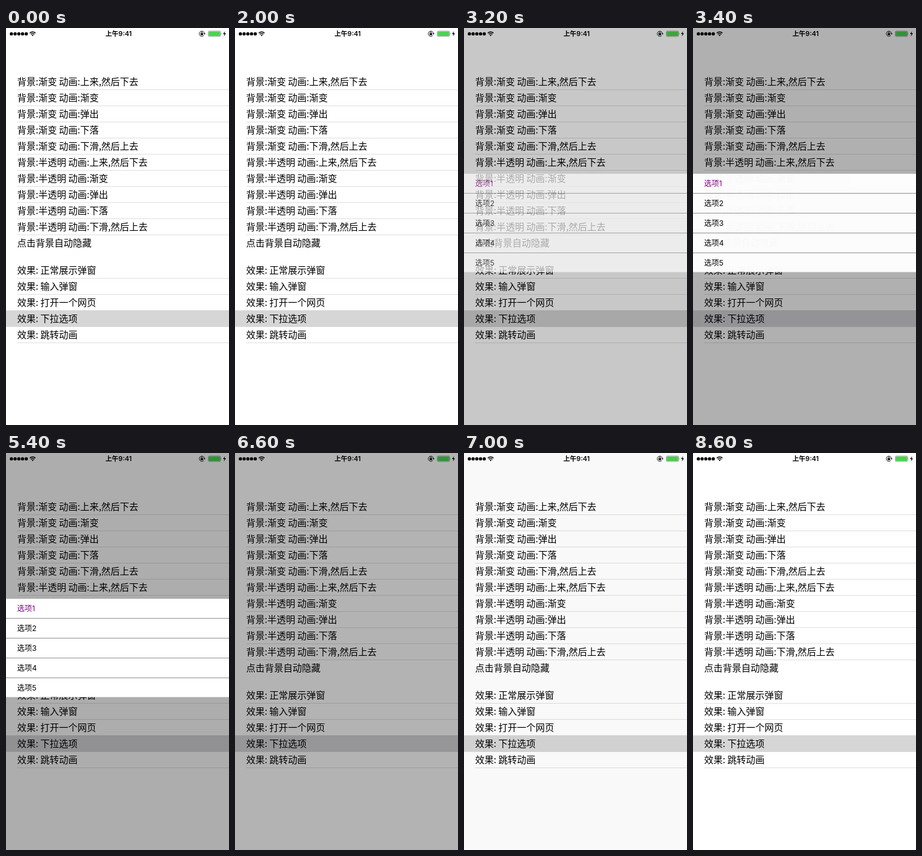
Animation of 360x640 px, one loop 8.8 s. Source, as an HTML page:

```html
<!DOCTYPE html>
<html lang="zh-CN">
<head>
<meta charset="utf-8">
<style>
html, body { margin: 0; width: 100%; height: 100%; overflow: hidden; background: #fff; }
svg { display: block; width: 360px; height: 640px; }
#list { font: 15px "Noto Sans CJK SC", "Noto Sans CJK", sans-serif; }
#panel { font: 12px Inter, "Noto Sans CJK SC", "Noto Sans CJK", sans-serif; }
#clock { font: 600 10.6px Inter, "Noto Sans CJK SC", "Noto Sans CJK", sans-serif; }
text { white-space: pre; }
</style>
</head>
<body>
<svg viewBox="0 0 360 640">
  <rect width="360" height="640" fill="#fff"/>
  <g id="list"></g>
  <g id="dots"></g>
  <g fill="none" stroke="#000" stroke-width="1.5">
    <path d="M38.4 8.2a6.6 6.6 0 0 1 9.2 0M40.2 10.2a4 4 0 0 1 5.6 0"/>
    <path d="M43 13.2l-1.6-1.7a2.3 2.3 0 0 1 3.2 0z" fill="#000" stroke="none"/>
  </g>
  <text id="clock" x="181.7" y="13" text-anchor="middle">上午9:41</text>
  <g fill="none" stroke="#000" stroke-width=".9">
    <path d="M319.2 12.2a4.2 4.2 0 1 1 1.2-3.2"/>
    <path d="M315 8.8v-1a1.2 1.2 0 0 1 2.4 0v1"/>
    <path d="M319 8.8h3l-1.5 2zM314.2 8.5h4v3h-4z" fill="#000" stroke="none"/>
  </g>
  <rect x="326.5" y="4.8" width="20" height="9" rx="1.8" fill="#fff" stroke="#777" stroke-width=".6"/>
  <rect x="327.2" y="5.5" width="18.6" height="7.6" rx="1" fill="#4cd250"/>
  <path d="M347.3 7.8q1.4 1.5 0 3z" fill="#777"/>
  <path d="M353.6 5l-3.2 4.8h2.3l-1.2 4 3.7-5.2h-2.4z"/>
  <rect id="dim" width="360" height="640" fill="#030004"/>
  <g id="panel"><rect y="235" width="360" height="158.5" fill="#fff"/></g>
</svg>
<script>
const LOOP = 8800, STEP = 200, MAX_DIM = 0.32;
const $ = id => document.getElementById(id);

function add(parent, tag, attrs, label = "") {
  const el = document.createElementNS("http://www.w3.org/2000/svg", tag);
  for (const key in attrs) el.setAttribute(key, attrs[key]);
  el.textContent = label;
  $(parent).append(el);
}

function rule(parent, x, y, fill) {
  add(parent, "rect", { x, y, width: 360 - x, height: 1, fill });
}

const moves = ["上来,然后下去", "渐变", "弹出", "下落", "下滑,然后上去"];
const rows = ["渐变", "半透明"].flatMap(bg => moves.map(m => `背景:${bg} 动画:${m}`));
rows.push("点击背景自动隐藏");
const effects = ["正常展示弹窗", "输入弹窗", "打开一个网页", "下拉选项", "跳转动画"];

rows.forEach((label, i) => {
  const y = 73 + 26 * i;
  if (i < 10) rule("list", 18, y + 26, "#dfdee1");
  add("list", "text", { x: 18, y: y + 19 }, label);
});
effects.forEach((label, i) => {
  const y = 377 + 26 * i;
  rule("list", 18, y + 26, "#dfdee1");
  if (i === 3) add("list", "rect", { y: y + 0.2, width: 360, height: 26.6, fill: "#d6d6d7" });
  add("list", "text", { x: 18, y: y + 19 }, "效果: " + label);
});
for (let i = 0; i < 5; i++) {
  add("dots", "circle", { cx: 8.7 + 6 * i, cy: 9.4, r: 2.6 });
  add("panel", "text", { x: 18, y: 255.4 + 31.9 * i, fill: i ? "#000" : "#800080" }, "选项" + (i + 1));
  if (i < 4) rule("panel", 0, 266 + 32 * i, "#929292");
}

function ease(t, from, to) {
  const p = Math.min(1, Math.max(0, (t - from) / (to - from)));
  return p * p * (3 - 2 * p);
}

const start = performance.now();
function draw() {
  // The picture advances in fixed steps
  const t = Math.floor(((performance.now() - start) % LOOP) / STEP) * STEP;
  const shown = ease(t, 2770, 3470);
  $("dim").setAttribute("opacity", MAX_DIM * (shown - ease(t, 6500, 7100)));
  $("panel").setAttribute("opacity", shown - ease(t, 6220, 6580));
  requestAnimationFrame(draw);
}
draw();
</script>
</body>
</html>
```
